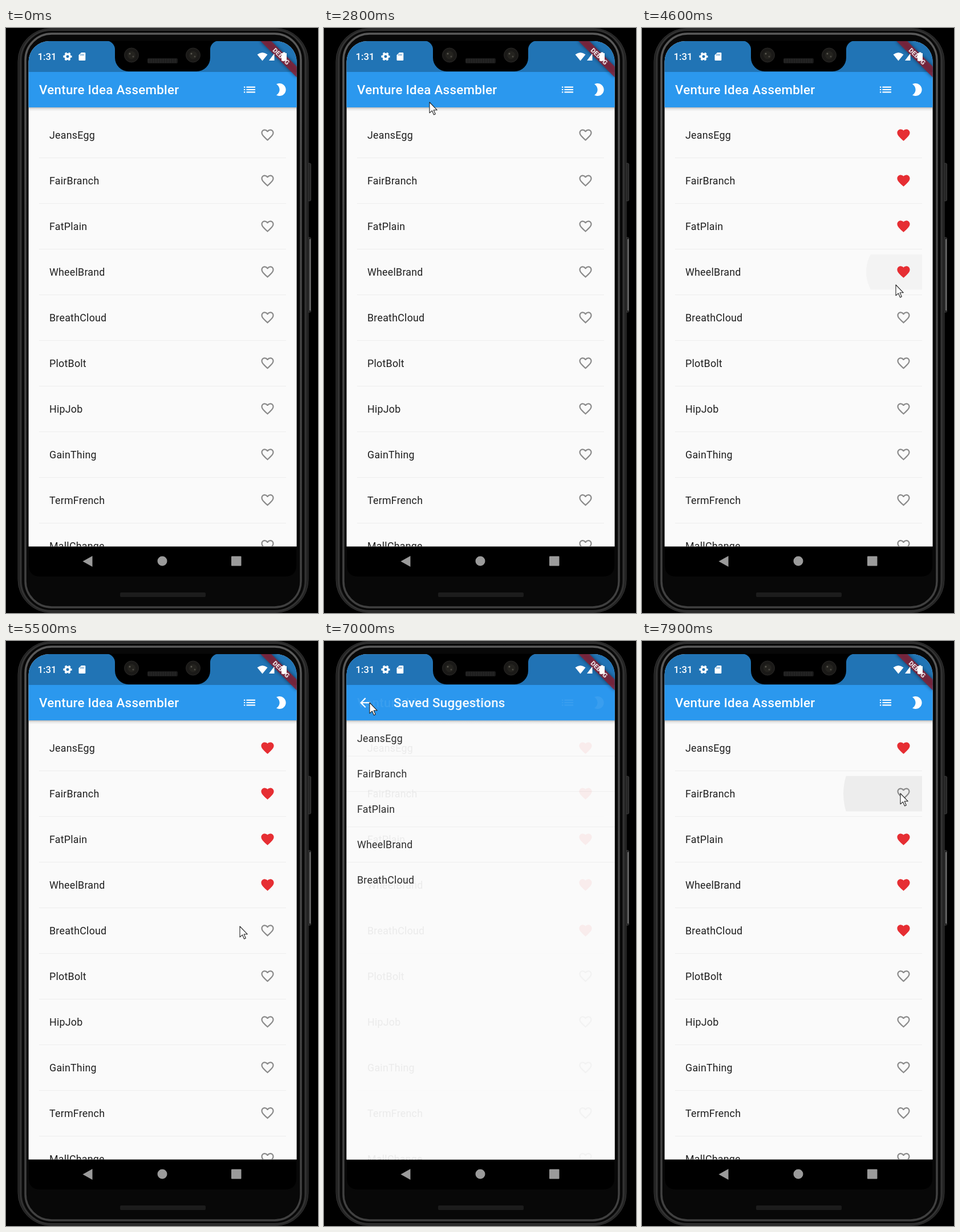
These frames come from a looping animation (547x1025 px, 8000 ms). An HTML page:

```html
<!DOCTYPE html>
<html lang="en">
<head>
<meta charset="utf-8">
<title>Name list app</title>
<style>
  html, body { margin: 0; width: 100%; height: 100%; overflow: hidden; background: #000; }
  svg { display: block; }
  #stage { width: 100vw; height: 100vh; }
  text { font-family: Roboto, sans-serif; }
  .title { font-size: 22.4px; font-weight: 500; letter-spacing: .24px; fill: #fff; }
  .item { font-size: 17.85px; letter-spacing: .23px; fill: #1f1f1f; }
  .white { fill: #fff; }
  .line { fill: #ededed; }
</style>
</head>
<body>
<svg id="stage" viewBox="0 0 547 1025" preserveAspectRatio="none">
  <defs>
    <linearGradient id="shade" x2="0" y2="1">
      <stop offset="0" stop-opacity=".26"/>
      <stop offset=".4" stop-opacity=".08"/>
      <stop offset="1" stop-opacity="0"/>
    </linearGradient>
    <linearGradient id="rim" x2="0" y2="1">
      <stop offset="0" stop-color="#5a5a5a"/>
      <stop offset=".3" stop-color="#484848"/>
      <stop offset="1" stop-color="#404040"/>
    </linearGradient>
    <clipPath id="screen">
      <path d="M39.600 908.400V59A36 36 0 0 1 75.600 23H473.600A36 36 0 0 1 509.600 59V908.400Z"/>
    </clipPath>
    <filter id="soft" x="-20%" y="-100%" width="140%" height="300%">
      <feGaussianBlur stdDeviation="3"/>
    </filter>
    <path id="full" d="M12 21.35l-1.45-1.32C5.4 15.36 2 12.28 2 8.5 2 5.42 4.42 3 7.5 3c1.74 0 3.41.81 4.5 2.09C13.09 3.81 14.76 3 16.5 3 19.58 3 22 5.42 22 8.5c0 3.78-3.4 6.86-8.55 11.54L12 21.35z"/>
    <path id="empty" d="M16.5 3c-1.74 0-3.41.81-4.5 2.09C10.91 3.81 9.24 3 7.5 3 4.42 3 2 5.42 2 8.5c0 3.78 3.4 6.86 8.55 11.54L12 21.35l1.45-1.32C18.6 15.36 22 12.28 22 8.5 22 5.42 19.58 3 16.5 3zm-4.4 15.55l-.1.1-.1-.1C7.14 14.24 4 11.39 4 8.5 4 6.5 5.5 5 7.5 5c1.54 0 3.04.99 3.57 2.36h1.87C13.46 5.99 14.96 5 16.5 5c2 0 3.5 1.5 3.5 3.5 0 2.89-3.14 5.74-7.9 10.05z"/>
    <g id="bar">
      <rect x="39" y="139" width="471" height="7" fill="url(#shade)"/>
      <rect x="39" y="23" width="471" height="116" fill="#2b98ee"/>
    </g>
  </defs>

  <!-- phone body -->
  <rect x="526" y="237" width="8.500" height="66" rx="2" fill="#262626" stroke="#3a3a3a"/>
  <rect x="526" y="367" width="8.500" height="131" rx="2" fill="#222" stroke="#3c3c3c"/>
  <path d="M533 370V495" stroke="#808080" stroke-width="1.600"/>
  <g fill="none">
    <rect x="21" y=".5" width="509" height="1024" rx="58" fill="#202020" stroke="#363636"/>
    <rect x="25.500" y="3.500" width="500" height="1018" rx="54" stroke="#323232" stroke-width="3"/>
    <rect x="29.500" y="6.500" width="492" height="1012" rx="50" fill="#080808" stroke="#080808" stroke-width="3"/>
    <rect x="34" y="10" width="483" height="1005" rx="46" stroke="url(#rim)" stroke-width="3.500"/>
  </g>
  <path d="M40 900H509V941Q509 961 489 961H60Q40 961 40 941Z"/>
  <rect x="200" y="989" width="150" height="8" rx="2" fill="#1c1c1c"/>

  <g clip-path="url(#screen)">
    <rect x="39" y="23" width="471" height="886" fill="#fafafa"/>
    <svg id="tile" x="58" width="433" height="62"><circle id="ripple" cx="400" cy="31"/></svg>
    <g id="rows"></g>
    <use href="#bar"/>
    <text class="title" x="58" y="116.3">Venture Idea Assembler</text>
    <path class="white" transform="translate(413.7 94.7) scale(1.108)" d="M3 13h2v-2H3zM3 17h2v-2H3zM3 9h2V7H3zM7 13h14v-2H7zM7 17h14v-2H7zM7 7v2h14V7z"/>
    <path class="white" transform="translate(468.5 94.7) scale(1.108)" d="M10 2c-1.82 0-3.53.5-5 1.35C7.99 5.08 10 8.3 10 12s-2.01 6.92-5 8.65C6.47 21.5 8.18 22 10 22c5.52 0 10-4.48 10-10S15.52 2 10 2z"/>

    <g id="page">
      <rect x="39" y="23" width="471" height="886" fill="#fafafa"/>
      <use href="#bar"/>
      <path class="white" transform="translate(58.7 94.7) scale(1.108)" d="M20 11H7.83l5.59-5.59L12 4l-8 8 8 8 1.41-1.41L7.83 13H20z"/>
      <text class="title" x="122" y="116.3">Saved Suggestions</text>
      <g id="saved"></g>
    </g>

    <!-- status bar -->
    <rect x="39" y="23" width="471" height="54" fill-opacity=".24"/>
    <g transform="translate(482.4 49.6) rotate(45)">
      <rect x="-45" y="-6.7" width="90" height="13.4" fill-opacity=".5" filter="url(#soft)"/>
      <rect x="-45" y="-6.7" width="90" height="13.4" fill="#8c1f33" fill-opacity=".8"/>
      <text class="white" y="4" text-anchor="middle" font-size="11.3" font-weight="900" fill-opacity=".85">DEBUG</text>
    </g>
    <g class="white">
      <text x="55.5" y="56.2" font-size="16.8" font-weight="500">1:31</text>
      <circle cx="108" cy="50" r="4.2" fill="none" stroke="#fff" stroke-width="3.4"/>
      <circle cx="108" cy="50" r="6.6" fill="none" stroke="#fff" stroke-width="2" stroke-dasharray="3.6 3.31" stroke-dashoffset="1.8"/>
      <path d="M132 43H138Q139.3 43 139.3 44.3V55.7Q139.3 57 138 57H128.8Q127.5 57 127.5 55.7V47.5Z"/>
      <path d="M440.5 46.5Q449.5 39.5 458.5 46.5L449.5 57.5Z"/>
      <path d="M470.5 44.5V57H461Z"/>
      <path d="M485.500 42.500H489.500V44H492V57.500H483V44H485.500Z"/>
    </g>
    <path d="M131 45.500V48.500M133.500 45.500V48.500M136 45.500V48.500" stroke="#2173b5"/>
  </g>

  <!-- notch -->
  <path d="M176 22.500A15 15 0 0 1 191 37.500V52A24 24 0 0 0 215 76H334A24 24 0 0 0 358 52V37.500A15 15 0 0 1 373 22.500Z"/>
  <g id="lenses"></g>
  <rect x="248" y="53" width="53" height="9" rx="2" fill="#191919"/>
  <path d="M249 57.500H300" stroke="#303030" stroke-width="7" stroke-dasharray="1 2"/>

  <!-- navigation bar -->
  <g fill="#9b9b9b">
    <path d="M151.500 925V944L134.500 934.500Z"/>
    <circle cx="274" cy="934" r="8.500"/>
    <rect x="395" y="925.500" width="17.500" height="17" rx="1"/>
  </g>

  <path id="cursor" d="M0 0V18.800L4.400 14.800 7.600 22 10.300 20.800 7.200 13.800H13.300Z" fill="#fff" stroke="#222" stroke-width="1.100" stroke-linejoin="round"/>
</svg>

<script>
const LOOP = 8000, STEP = 100, PITCH = 79.95;
const names = ["JeansEgg", "FairBranch", "FatPlain", "WheelBrand", "BreathCloud",
  "PlotBolt", "HipJob", "GainThing", "TermFrench", "MallChange"];
const likedAt = [3400, 4000, 4300, 4500, 5700];
const unlike = { row: 1, time: 7800, press: 7600 };

// time, x, y
const path = [
  [1900, 239, 93], [2100, 205, 108], [2400, 172, 128], [2700, 170, 126],
  [2800, 185, 130], [3100, 400, 437], [3300, 450, 230], [3400, 456, 190],
  [3600, 460, 200], [3700, 460, 200], [3800, 465, 220], [4000, 458, 264],
  [4300, 456, 345], [4500, 452, 428], [4600, 445, 450], [4700, 435, 475],
  [5000, 400, 683], [5200, 395, 640], [5500, 410, 500], [5700, 445, 508],
  [6000, 428, 112], [6100, 427, 106], [6200, 375, 112], [6400, 145, 121],
  [6500, 95, 113], [6600, 72, 106], [6900, 72, 106], [7000, 80, 108],
  [7200, 422, 241], [7400, 452, 264], [7800, 453, 266], [7900, 453, 267]
];

const $ = id => document.getElementById(id);
const rowY = i => 187.6 + i * PITCH;

$("rows").innerHTML = names.map((name, i) => {
  const y = rowY(i);
  return `<text class="item" x="76" y="${y + 6.5}">${name}</text>
    <use class="heart" transform="translate(445.200 ${y - 13.4}) scale(1.108)"/>
    <rect class="line" x="58" y="${Math.round(y + 39.8)}" width="433" height="1"/>`;
}).join("");

$("saved").innerHTML = names.slice(0, 5).map((name, i) => {
  const y = 170 + i * 62;
  const line = i < 4 ? `<rect class="line" x="39" y="${y + 31}" width="471" height="1"/>` : "";
  return `<text class="item" x="58" y="${y + 6.5}">${name}</text>${line}`;
}).join("");

$("lenses").innerHTML = [220, 328].map(x =>
  `<circle cx="${x}" cy="47.500" r="12.500" fill="#1b1a18" stroke="#292826"/>
   <circle cx="${x}" cy="47.500" r="7" fill="#24231f"/>
   <circle cx="${x - 3}" cy="45" r="1.500" fill="#5a5850"/>
   <circle cx="${x + 3}" cy="50" r="1.500" fill="#4a4842"/>`).join("");

const hearts = document.querySelectorAll(".heart");
const clamp = v => Math.min(1, Math.max(0, v));

// cubic-bezier(x1, 0, x2, 1)
function bezier(x1, x2) {
  const at = (s, a, b) => 3 * (1 - s) ** 2 * s * a + 3 * (1 - s) * s * s * b + s ** 3;
  return x => {
    let lo = 0, hi = 1;
    for (let i = 0; i < 20; i++) {
      const mid = (lo + hi) / 2;
      if (at(mid, x1, x2) < x) lo = mid; else hi = mid;
    }
    return at(lo, 0, 1);
  };
}
const fastOutSlowIn = bezier(.4, .2), easeIn = bezier(.42, 1);

function drawCursor(t) {
  const next = path.findIndex(p => p[0] > t);
  const b = path[next < 0 ? path.length - 1 : next];
  const a = next < 0 ? b : path[next - 1];
  $("cursor").setAttribute("visibility", a ? "visible" : "hidden");
  if (!a) return;
  const k = a === b ? 0 : (t - a[0]) / (b[0] - a[0]);
  const [x, y] = [1, 2].map(i => a[i] + (b[i] - a[i]) * k);
  $("cursor").setAttribute("transform", `translate(${x} ${y})`);
}

function drawHearts(t) {
  hearts.forEach((heart, i) => {
    const on = t >= likedAt[i] && !(i === unlike.row && t >= unlike.time);
    heart.setAttribute("href", on ? "#full" : "#empty");
    heart.setAttribute("fill", on ? "#e62e33" : "#8b8b8b");
  });
}

function drawRipple(t) {
  const held = t >= unlike.press;
  const row = held ? unlike.row : likedAt.findIndex(s => t >= s && t < s + 200);
  $("tile").setAttribute("visibility", row < 0 ? "hidden" : "visible");
  if (row < 0) return;
  const age = t - (held ? unlike.press : likedAt[row]);
  $("tile").setAttribute("y", rowY(row) - 31);
  $("ripple").setAttribute("r", Math.min(105, 25 + age * .4));
  $("ripple").setAttribute("fill-opacity", held ? .052 : .052 * (1 - age / 200));
}

function drawPage(t) {
  const open = clamp((t - 6141) / 300) - clamp((t - 6988) / 300);
  $("page").setAttribute("visibility", open > 0 ? "visible" : "hidden");
  $("page").setAttribute("opacity", open < 1 ? easeIn(open) : 1);
  $("page").setAttribute("transform", `translate(0 ${open < 1 ? (1 - fastOutSlowIn(open)) * 221 : 0})`);
}

const start = performance.now();
function tick() {
  const t = Math.floor((performance.now() - start) % LOOP / STEP) * STEP;
  drawCursor(t);
  drawHearts(t);
  drawRipple(t);
  drawPage(t);
  requestAnimationFrame(tick);
}
tick();
</script>
</body>
</html>
```
